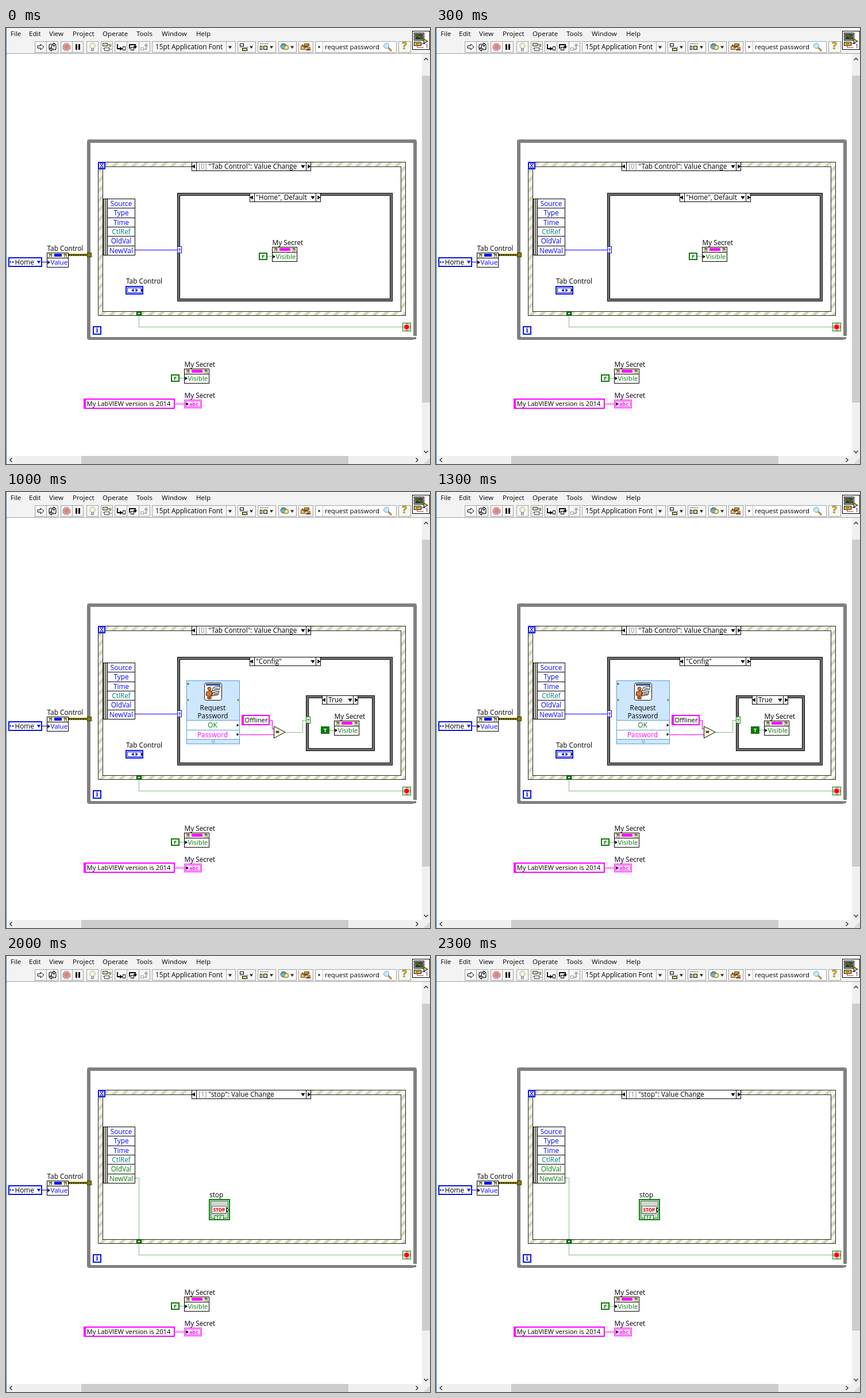
An HTML page that plays this animation: 738x759 px, repeating every 2500 ms.

```html
<!DOCTYPE html>
<html lang="en">
<head>
<meta charset="utf-8">
<title>Block diagram</title>
<style>
  html, body { margin: 0; width: 100%; height: 100%; overflow: hidden; background: #fff; }
  svg { display: block; width: 738px; height: 759px; font: 11.8px "Open Sans", "Noto Sans", sans-serif; }
  text { white-space: pre; }
</style>
</head>
<body>
<svg id="stage" viewBox="0 0 738 759" xmlns="http://www.w3.org/2000/svg"></svg>
<script>
const BLUE = '#0000ff', NAVY = '#0a14e0', GREEN = '#087a08', PINK = '#ff00ff', INK = '#000',
      CREAM = '#fffbd8', GREY = '#808080', OLIVE = '#857a00', TEAL = '#008080';

// Basic shapes
const rect = (x, y, w, h, fill) =>
  `<rect x="${x}" y="${y}" width="${w}" height="${h}" fill="${fill}" shape-rendering="crispEdges"/>`;
const box = (x, y, w, h, line, fill = '#fff', b = 1) =>
  rect(x, y, w, h, line) + rect(x + b, y + b, w - 2 * b, h - 2 * b, fill);
const poly = (points, fill, line = 'none') =>
  `<polygon points="${points}" fill="${fill}" stroke="${line}"/>`;
const path = (d, line, width = 1, extra = '') =>
  `<path d="${d}" fill="none" stroke="${line}" stroke-width="${width}" ${extra}/>`;
const circle = (x, y, r, fill, line = 'none') =>
  `<circle cx="${x}" cy="${y}" r="${r}" fill="${fill}" stroke="${line}"/>`;
// y is the vertical middle of the line of text
const text = (s, x, y, fill = INK, extra = '') =>
  `<text x="${x}" y="${y + 4.3}" fill="${fill}" ${extra}>${s}</text>`;
const mid = 'text-anchor="middle"';
const bold = size => `${mid} font-weight="700" font-size="${size}"`;
const tri = (x, y, dir, fill = INK, s = 3) => {
  const p = {
    r: [-s / 2, -s, s, 0, -s / 2, s], l: [s / 2, -s, -s, 0, s / 2, s],
    d: [-s, -s / 2, s, -s / 2, 0, s]
  }[dir];
  return poly(p.map((v, i) => v + (i % 2 ? y : x)).join(' '), fill);
};

// Wires
const dotted = d => path(d, GREEN, 1, 'stroke-dasharray="1 1" shape-rendering="crispEdges"');
const zigzag = (x1, x2, y) => {
  let d = `M${x1} ${y}`;
  for (let x = x1 + 2, i = 0; x <= x2; x += 2, i++) d += `L${x} ${y + (i % 2 ? -.5 : .5)}`;
  return path(d, PINK, 1.1);
};

// Diagram parts
const selector = (x, y, w, label, tx) =>
  box(x, y, w, 16, INK) + rect(x + 8, y, 1, 16, INK) + rect(x + w - 9, y, 1, 16, INK) +
  tri(x + 4, y + 8, 'l', INK, 3.6) + tri(x + w - 4, y + 8, 'r', INK, 3.6) + tri(x + w - 14, y + 7.5, 'd', INK, 3.7) +
  text(label, tx, y + 8);

const caseFrame = (x, y, w, h) =>
  box(x, y, w, h, INK, 'url(#check)') + box(x + 4, y + 4, w - 8, h - 8, INK);

const query = (x, y, color) => box(x, y, 8, 12, color) + text('?', x + 4, y + 5.5, color, bold(9));

const property = (x, y, w, color, title, name, nameColor) =>
  text(title, x + .5, y - 7.7) + box(x, y, w, 26, INK) + rect(x + 1, y + 1, w - 2, 8, CREAM) +
  rect(x, y + 9, w, 1, INK) + rect(x + 13, y + 2, w - 25, 5, color) +
  text('?!', x + 6.5, y + 4, INK, bold(8)) + text('?!', x + w - 6, y + 4, INK, bold(8)) +
  tri(x + 3, y + 17, 'r') + text(name, x + 6.5, y + 17, nameColor, 'font-size="11.6"');

const boolConst = (x, y, value) => {
  const on = value === 'T';
  return box(x, y, 15, 13, GREEN, on ? GREEN : '#fff', 2) +
    text(value, x + 7.5, y + 6, on ? '#fff' : GREEN, bold(9.5));
};

const secret = (x, y, value) =>
  property(x, y, 44, PINK, 'My Secret', 'Visible', GREEN) +
  boolConst(x - 23, y + 10, value) + dotted(`M${x - 8} ${y + 16.5}H${x}`);

const stringConst = (x, y, w, label) =>
  box(x, y, w, 18, PINK, '#fff', 2) + rect(x + 2, y + 2, 2, 14, PINK) +
  text(label, x + 5.5, y + 9, INK, 'font-size="11.3"');

const dataNode = (oldColor, newColor) => {
  const rows = ['Source', 'Type', 'Time', 'CtlRef', 'OldVal', 'NewVal'];
  const colors = [BLUE, BLUE, BLUE, TEAL, oldColor, newColor];
  return box(169, 297, 56, 99, INK) + box(169, 297, 8, 99, INK, '#c4c4bc') + rect(172, 298, 2, 97, '#77776e') +
    rows.map((row, i) => {
      const y = Math.round(297 + i * 16.3);
      return rect(176, y, 49, 1, INK) + text(row, 200.5, y + 8.3, colors[i], mid);
    }).join('');
};

const eventLabel = (n, name) =>
  selector(323, 233, 208, `<tspan fill="#888">[${n}]</tspan> "${name}": Value Change`, 335);

// Window frame, menu and toolbar
function chrome() {
  let s = rect(0, 0, 738, 759, '#fff') + rect(0, 0, 738, 44, '#f3f3f3') + rect(0, 44, 738, 1, '#a0a0a0');
  const menu = { File: 8, Edit: 40, View: 75, Project: 116, Operate: 168, Tools: 227, Window: 271, Help: 331 };
  for (const name in menu) s += text(name, menu[name], 9.5, INK, 'font-size="11.6"');

  const buttons = [[50, 21], [70, 21], [95, 21], [115, 20], [140, 21], [165, 21], [189, 22], [210, 22], [231, 20],
    [254, 146], [403, 32], [438, 32], [474, 32], [509, 26], [538, 142], [683, 22]];
  for (const [x, w] of buttons) s += box(x, 23, w, 20, '#a2a2a2', x === 538 ? '#fff' : '#f6f6f6');

  s += poly('55,31 60,31 60,28 66,33 60,38 60,35 55,35', '#fff', INK);
  s += path('M75 35V31a3 3 0 0 1 3-3h5v-2l4 3-4 3v-2h-4v5zM87 31v4a3 3 0 0 1-3 3h-5v2l-4-3 4-3v2h4', INK, 1.1);
  s += poly('102,27 108,27 112,31 112,36 108,39 102,39 99,36 99,31', '#e8a0a0', '#a88') + circle(105.5, 33, 4, '#d98080');
  s += rect(121, 28, 3, 10, INK) + rect(126, 28, 3, 10, INK);
  s += circle(150.5, 31, 4.5, '#fff8d8', '#999') + box(148, 35, 5, 5, '#888', '#ccc');
  s += box(168, 26, 9, 6, '#444', '#b8d8b0') + box(171, 34, 9, 6, '#444', '#fff') +
    path('M177 29h5v4M180 37h4M168 36h3', '#3a7d3a', 1.2) + circle(181, 30, 2, '#e8c860', '#665');
  s += path('M194 28v8h5', INK, 1.8) + tri(200, 36, 'r', INK, 3.3) + box(203, 32, 5, 7, INK);
  s += path('M215 36v-7h10v3', INK, 1.8) + tri(225, 33, 'd', INK, 3.2) + box(217, 33, 6, 6, INK);
  s += box(234, 34, 6, 5, '#999') + path('M240 37h4v-7', '#999', 1.6) + poly('241,31 244,27 247,31', '#d8c860', '#999');

  s += text('15pt Application Font', 260, 33) + rect(383, 24, 1, 18, '#b0b0b0') + tri(390, 33, 'd', '#222', 3.2);
  const dashes = 'stroke-dasharray="2 1" shape-rendering="crispEdges"';
  s += box(407, 27, 7, 5, INK) + path('M407 33.500h14', '#444', 1, dashes) + box(411, 35, 9, 5, INK, '#e8d27a');
  s += path('M442 27.500h14', '#444', 1, dashes) + box(442, 31, 4, 7, INK) + box(448, 31, 7, 7, INK, '#e8d27a');
  s += circle(483, 32, 5, '#7db1dc', '#3d6a97') + circle(488, 34, 4, '#ead45c', '#8a7a20') + circle(488, 34, 1.5, '#fff') +
    path('M479 31q4-5 9 0', '#4a9350', 2);
  for (const x of [427, 462, 498]) s += tri(x, 33, 'd', '#222', 3);
  s += box(513, 31, 8, 7, '#6b5a20', '#e0b84c') + box(519, 27, 9, 5, '#5b4a18', '#c99b32') +
    path('M515 29l6 5 5-3M522 38h8', '#5b4312', 1.8) + rect(524, 33, 6, 4, '#b98532');
  s += rect(551, 24, 1, 18, '#c4c4c4') + tri(545, 33, 'r', '#222', 2.4) + text('request password', 555, 33, INK, 'font-size="11.4"');
  s += path('M665 34l6 6', '#b5793a', 2.8) + circle(662, 31, 4.5, '#cbe7fa', '#6f9dc0');
  s += text('?', 693.5, 32.5, '#e3c800', bold(17) + ' stroke="#665600" stroke-width=".6"');

  // Panel icon
  s += box(707, 5, 31, 33, INK) + box(710, 8, 18, 14, INK, '#d8d8d8') + box(712, 10, 14, 10, '#333', '#134f25') +
    path('M713 16q3-8 6-1t6-1', '#d63a2c', 1.2) + path('M713 14h12', '#4eaa58', .8) +
    box(710, 24, 13, 7, INK, '#f0d44c') + path('M713 27.500h7', INK) +
    path('M723 27.500h6v-5', '#2060c8', 1.2) + poly('727,19 734,23 727,27', '#e6c43b', INK) + path('M716 31v3h11', '#c33', 1.2) +
    text('1', 732.5, 31, INK, mid + ' font-size="9"');

  // Scrollbars
  s += rect(724, 45, 14, 701, '#f0f0f0') + rect(724, 83, 14, 569, '#cdcdcd') +
    rect(0, 745, 738, 14, '#f0f0f0') + rect(131, 745, 465, 14, '#cdcdcd') +
    path('M727.5 56l3.5-3.5 3.5 3.5M727.5 736l3.5 3.5 3.5-3.5M10.5 748.5l-3.5 3.5 3.5 3.5M713.5 748.5l3.5 3.5-3.5 3.5', '#444', 1.7);
  for (let i = 0; i < 3; i++)
    for (let j = 0; j <= i; j++) s += rect(735 - 3 * j, 750 + 3 * i, 2, 2, '#bdbdbd');
  return s + rect(0, 0, 1, 759, '#2079c7');
}

// Everything that stays in place on the diagram
function base() {
  return rect(141, 197, 6, 343, GREY) + rect(709, 197, 6, 340, GREY) +
    rect(144, 194, 568, 6, GREY) + rect(144, 538, 565, 5, GREY) +
    box(160, 233, 536, 268, '#222', 'url(#stripe)') + box(168, 241, 520, 253, '#222') +
    box(160, 233, 13, 13, NAVY, '#fff', 2) + path('M163.5 236h6l-6 7h6l-6-7', NAVY, 1.1) +
    // ring constant and tab property
    box(4, 399, 59, 17, NAVY, '#fff', 2) + tri(8, 407.5, 'l', NAVY, 2) + tri(12, 407.5, 'r', NAVY, 2) +
    text('Home', 15.5, 407.7) + tri(57, 407, 'd', NAVY, 3.3) + rect(63, 407, 8, 1, BLUE) +
    property(71, 391, 38, BLUE, 'Tab Control', 'Value', BLUE) +
    rect(109, 393, 33, 4, OLIVE) + path('M109 395H142', '#2a2500', 2, 'stroke-dasharray="2 2"') +
    box(141, 391, 8, 8, '#3d3800', OLIVE) +
    // loop terminals
    box(151, 519, 15, 15, NAVY, '#fff', 2) + text('i', 158.5, 526, NAVY, bold(12) + ' font-family="Noto Serif, serif"') +
    dotted('M231.5 500V520.5H690') + box(690, 513, 15, 15, GREEN, '#fff') +
    poly('695.5,515 700,515 703,518 703,523 700,526 695.5,526 692.5,523 692.5,518', '#fff', '#c44') + circle(697.5, 520.5, 4, '#f00000') +
    // loose nodes
    secret(310, 593, 'F') +
    stringConst(135, 645, 159, 'My LabVIEW version is 2014') + zigzag(294, 310, 654.5) +
    text('My Secret', 310.5, 639.7) + box(310, 647, 31, 15, PINK) + box(312, 649, 27, 11, PINK) + tri(315, 654.5, 'r') +
    text('abc', 327, 653.5, PINK, bold(9) + ' font-family="DejaVu Sans Mono, monospace"');
}

const tunnel = () => box(227, 493, 9, 8, '#003c00', GREEN) + rect(230, 496, 3, 2, '#fff');

const resting = () =>
  rect(141, 194, 3, 3, '#fff') + rect(712, 194, 3, 3, '#fff') + rect(141, 540, 3, 3, '#fff') +
  path('M144 200v-3h3M709 197h3v3M144 537v3h3', GREY, 5.4, 'stroke-linejoin="round" stroke-linecap="round"') +
  rect(709, 538, 5, 4, GREY) + rect(708, 536, 7, 1, '#fff') + rect(708, 536, 1, 3, '#fff');

const handles = () => rect(709, 537, 6, 6, GREY) +
  [197, 369, 541].map((y, j) => [144, 428, 712].map((x, i) =>
    i === 1 && j === 1 ? '' : rect(x - 3, y - 3, 6, 6, '#1088ea')).join('')).join('');

const tabEvent = () =>
  eventLabel(0, 'Tab Control') + dataNode(BLUE, BLUE) + rect(225, 386, 74, 1, BLUE) +
  text('Tab Control', 209, 440.5) + box(208, 449, 31, 15, NAVY, '#fff', 2) + box(211, 452, 25, 9, NAVY) +
  tri(221, 456.5, 'l', NAVY, 3) + tri(227, 456.5, 'r', NAVY, 3) + tri(236, 456.5, 'r', INK, 2.6) +
  caseFrame(298, 287, 375, 189) + query(298, 380, BLUE) + tunnel();

const homeCase = () => selector(424, 287, 124, '"Home", Default', 435) + secret(463, 381, 'F');

const configCase = () =>
  selector(424, 287, 124, '"Config"', 435) +
  box(314, 328, 93, 111, '#5c9cdd', '#cfe7fc') + rect(315, 398, 91, 32, '#fff') +
  [397, 414, 430].map(y => rect(314, y, 93, 1, '#5c9cdd')).join('') +
  tri(317, 334, 'r', GREEN, 2.2) + tri(317, 362, 'r', OLIVE, 2.2) + tri(404, 362, 'r', OLIVE, 2.2) +
  tri(403, 406, 'r', INK, 2.6) + tri(403, 422, 'r', INK, 2.6) +
  `<rect x="345.5" y="332.5" width="30" height="30" rx="3" fill="#fff" stroke="#111"/>` + rect(348, 334, 25, 3, '#2548a0') +
  circle(354, 342.5, 3, '#e0792c', '#5c2b0c') +
  poly('349,348 358,346 359,353 357,353 357,360 351,360 351,354 348,354', '#e0792c', '#3c1c08') + path('M354 354v6', '#3c1c08') +
  poly('361,340 373,338 371,344 359,346', '#fff', '#111') + poly('360,349 371,347 369,353 358,355', '#ddd', '#111') +
  path('M362 343l8-1M361 352l7-1', '#111') +
  text('Request', 360, 375.5, INK, mid) + text('Password', 360, 389.7, INK, mid) +
  text('OK', 359.5, 406, GREEN, mid) + text('Password', 359.5, 422.5, PINK, mid) +
  path('M358 432l3 2 3-2M358 435l3 2 3-2', '#6797c8') +
  stringConst(410, 388, 49, 'Offliner') + path('M459 397.5H463.5V412.5H467', PINK, 1.2) + zigzag(407, 467, 422.5) +
  poly('466.5,408 486,418 466.5,428.5', CREAM, INK) + text('=', 472.5, 418, INK, bold(12)) +
  dotted('M486 418.5H516.5V397.5H522') +
  caseFrame(522, 354, 120, 97) + query(522, 391, GREEN);

const stopEvent = () =>
  eventLabel(1, 'stop') + dataNode(GREEN, GREEN) + dotted('M225 386.5H231.5V493') + tunnel() +
  text('stop', 354, 415.5) + box(353, 423, 37, 37, GREEN, '#fff', 2) + box(356, 426, 31, 31, GREEN, '#d4d4d4') +
  box(358, 435, 26, 14, '#777', '#e9e9e9') + rect(359, 447, 24, 1, '#aaa') +
  text('STOP', 371, 441, '#e00000', bold(8)) + poly('384.5,438 388,442 384.5,446', '#fff', INK) +
  box(363, 451, 16, 8, GREEN) + text('TF', 371, 454, GREEN, bold(7.5) + ' letter-spacing="1"');

// One digit per half second: 1 shows the part, 0 hides it
const parts = [
  ['11111', chrome() + base()],
  ['10111', resting()],
  ['01000', handles()],
  ['11110', tabEvent()],
  ['10000', homeCase()],
  ['01110', configCase()],
  ['01100', selector(550, 354, 63, 'True', 561) + secret(571, 398, 'T')],
  ['00010', selector(550, 354, 63, 'False', 561) + secret(577, 404, 'F')],
  ['00001', stopEvent()]
];

const stage = document.getElementById('stage');
stage.innerHTML = `<defs>
  <pattern id="check" width="2" height="2" patternUnits="userSpaceOnUse">
    ${rect(0, 0, 2, 2, '#c4c4c4') + rect(0, 0, 1, 1, '#222') + rect(1, 1, 1, 1, '#222')}
  </pattern>
  <pattern id="stripe" width="12" height="12" patternUnits="userSpaceOnUse" patternTransform="rotate(45)">
    <rect width="12" height="12" fill="#fbfae9"/><rect width="5" height="12" fill="#d6d4bf"/>
  </pattern>
</defs>` + parts.map(([, body]) => `<g>${body}</g>`).join('');

const start = document.timeline.currentTime;
stage.querySelectorAll(':scope > g').forEach((g, i) => {
  const shown = parts[i][0];
  if (!shown.includes('0')) return;
  const steps = [...shown, shown[4]].map((on, k) => ({ opacity: +on, offset: k / 5, easing: 'step-end' }));
  g.animate(steps, { duration: 2500, iterations: Infinity }).startTime = start;
});
</script>
</body>
</html>
```
